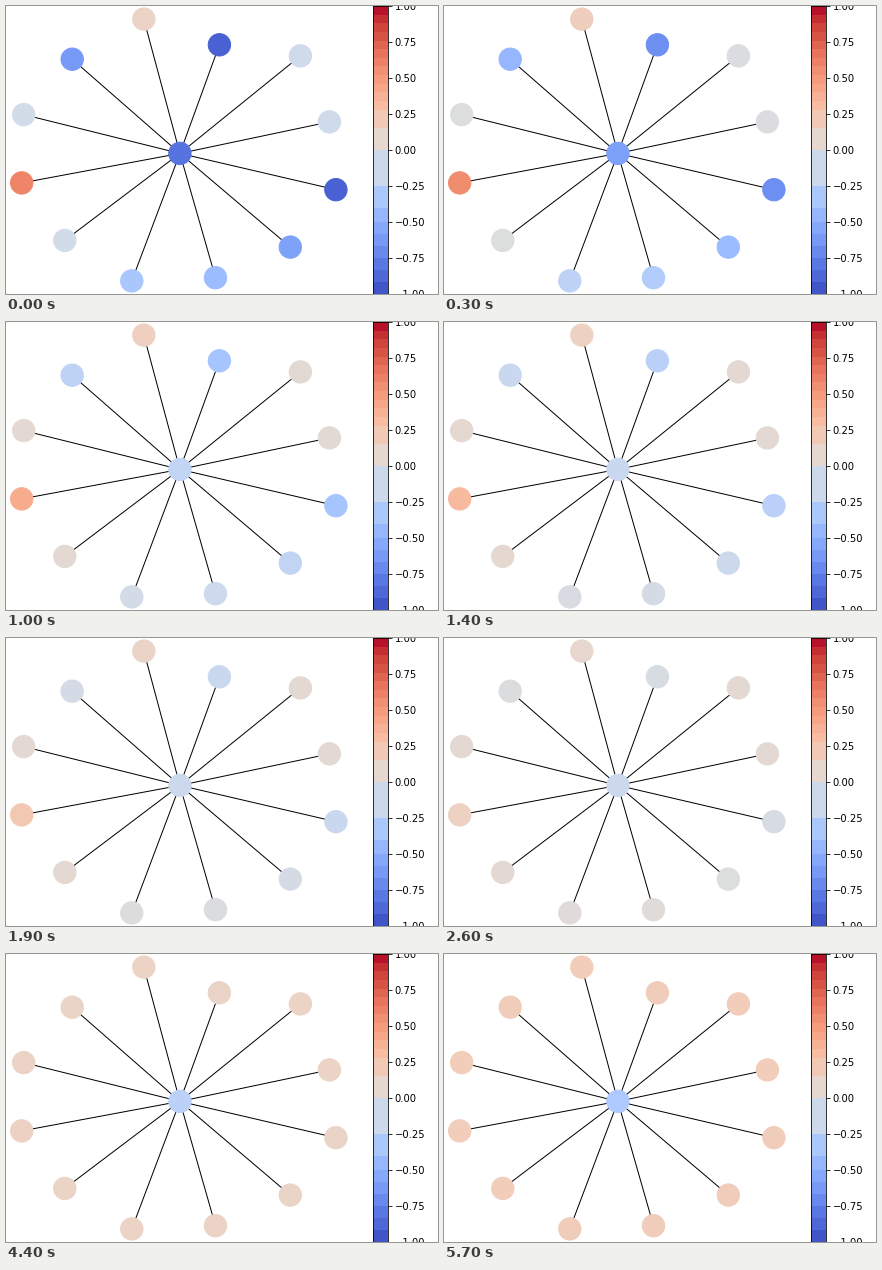
Recreate the animation shown at these times as a matplotlib script. Size 432x288 px, loop 5900 ms.

```python
import numpy as np
import matplotlib.pyplot as plt
from matplotlib.animation import FuncAnimation

W, H = 432, 288
FRAMES, STEP = 59, 100
cmap = plt.get_cmap("coolwarm")

# Star graph: hub position, then x, y and starting value of each leaf
hub = (173.9, 147.4)
leaves = np.array([
    (323.4, 115.9, -0.10), (294.4, 49.9, -0.10), (213.4, 38.8, -0.90),
    (137.8, 13.1, 0.12), (66.2, 53.2, -0.62), (17.7, 108.6, -0.08),
    (15.7, 176.9, 0.60), (58.8, 234.4, -0.08), (125.8, 274.9, -0.34),
    (209.5, 271.7, -0.42), (284.3, 241.1, -0.58), (329.9, 183.7, -0.90)])
xs, ys, start = leaves.T


def shade(value):
    """Colour of a value between -1 and 1."""
    return cmap((np.asarray(value) + 1) / 2)


def values(i):
    """Leaves settle on a common level, then hub and leaves drift apart."""
    t = i if i < 53 else 53 if i < 57 else 57
    drift = np.sin(np.pi / 2 * np.clip((t - 36) / 21, 0, 1))
    level = 0.05 - 0.2 * np.exp(-t / 5) + 0.13 * drift
    spread = (start + 0.15) * np.exp(-0.06 * t - 0.0008 * t * t)
    center = -0.12 - 0.7 * np.exp(-(t / 5.6) ** 1.5) - 0.2 * drift
    return np.append(center, level + spread)


fig = plt.figure(figsize=(W / 72, H / 72), dpi=72, facecolor="white")

ax = fig.add_axes([0, 0, 0.8, 1])
ax.set_xlim(0, 0.8 * W)
ax.set_ylim(H, 0)
ax.axis("off")
for x, y in zip(xs, ys):
    ax.plot([hub[0], x], [hub[1], y], color="black", lw=1, zorder=1)
nodes = ax.scatter(np.append(hub[0], xs), np.append(hub[1], ys), s=500,
                   c=shade(values(0)), linewidths=1, zorder=2)

# Colour scale: fine bands at the ends, wide ones around zero
bar = fig.add_axes([0.85, 0, 14.4 / W, 1])
bar.set_xlim(0, 1)
bar.set_ylim(-1, 1)
edges = np.r_[np.linspace(1, 0.28, 13), 0.15, 0, -0.25, -0.4,
              np.linspace(-0.5, -1, 7)]
for top, low in zip(edges[:-1], edges[1:]):
    bar.axhspan(low, top, color=shade((top + low) / 2), lw=0)
bar.set_xticks([])
bar.yaxis.tick_right()
bar.set_yticks(np.linspace(-1, 1, 9))


def update(i):
    rgba = shade(values(i))
    nodes.set_facecolor(rgba)
    nodes.set_edgecolor(rgba)
    return [nodes]


anim = FuncAnimation(fig, update, frames=FRAMES, interval=STEP,
                     init_func=lambda: update(0), repeat=True, repeat_delay=0)
plt.show()
```
